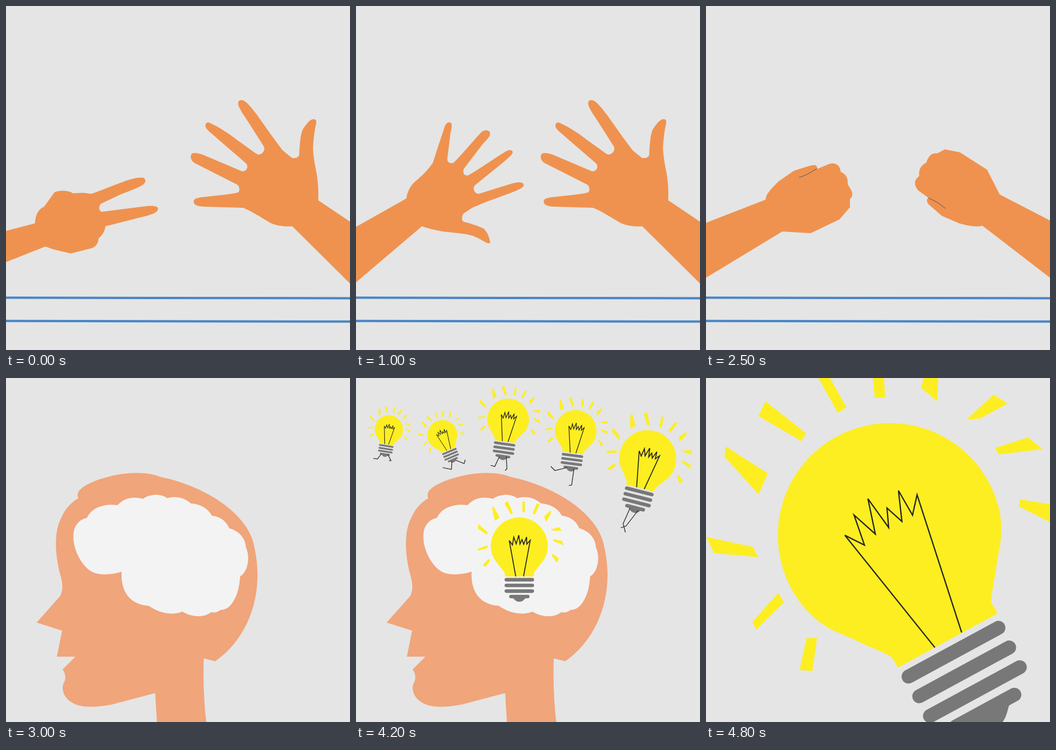
An HTML page for the animation above (5300 ms loop, 595 by 595 pixels).

```html
<!DOCTYPE html>
<html lang="en">
<head>
<meta charset="utf-8">
<title>Hands and ideas</title>
<style>
html, body { margin: 0; width: 100%; height: 100%; overflow: hidden; background: #e5e5e5; }
svg { display: block; width: 100%; height: 100%; }
.hand { fill: #ef924f; }
.crease { fill: none; stroke: #555; }
.table { fill: none; stroke: #4a86c5; stroke-width: 4; }
.glow { fill: #fdee21; }
.cap { fill: #787878; }
.bars { fill: none; stroke: #787878; stroke-width: 6.2; stroke-linecap: round; }
.wire { fill: none; stroke: #222; vector-effect: non-scaling-stroke; }
.legs { fill: none; stroke: #222; stroke-width: 1.2; }
</style>
</head>
<body>
<svg viewBox="0 0 595 595">
  <defs>
    <!-- upright bulb, globe radius 50 around the origin -->
    <g id="bulb">
      <path class="glow" d="M25.5 53.5L25.3 48C27.5 44 31 40.5 36 33.5C40 28 44.5 24.5 48 14A50 50 0 1 0-48 14C-44.5 24.5-40 28-36 33.5C-31 40.5-27.5 44-25.3 48L-25 53.5Z"/>
      <path class="glow" d="M-54.5 22.5L-50.5 24.8-59.3 36.7-64.1 33.5Z M-56.1-1.2L-55.8 3.7-72.5 8.5-72.4 4.7Z
        M-72.4-38.5L-56.2-24.6-56.3-19.5-72.7-30.4Z M-45.5-69.8L-34.7-50.2-42.8-44-48.1-66Z
        M-20.3-79L-11.2-57.8-14.7-55.7-26.2-74.7Z M5.4-78L9.9-78 10.1-59.3 5.6-59.1Z
        M30.9-75.3L35.4-72.3 27.4-55 23.3-57.1Z M55-62.6L55.5-56.6 47-42.5 43.5-51.2Z
        M70.4-33.1L74.2-26.6 60.1-26.6 54.7-29Z M74.9-9L78.1-1.3 59.7-8.6 59.8-11.9Z
        M58.6 13.6L69.5 22 65.6 29.1 56.6 16.1Z"/>
      <path class="wire" d="M-6.3 53.5L-17.7-9.6-12.1-1.6-9.8-15.6-5.5-3.6-.9-19 1.1-3.3 4.6-11.3 7.6-2.9 12.8-15.7 13.1-3.1 19.2-10.1 7.4 53.3"/>
      <path class="bars" d="M-22.8 59.3H22.8M-22.8 69.3H22.8M-22.8 79.3H22.8M-14.8 88.9H14.8"/>
      <path class="cap" d="M-14 90C-9 91-8 98 0 98S9 91 14 90Z"/>
    </g>
  </defs>

  <g id="game">
    <path class="table" d="M0 504.5L595 505.5M0 544.7L595 545.8"/>
    <g id="leftS"><path class="hand" d="M0 389L50 376C51 364 54 352 66 347L84 322C92 319 106 318 116 324C128 323 138 323 147 325C163 320 183 311 203 304C219 298 235 295 239 298C243 302 241 307 234 311C222 317 210 321 198 326L164 342C160 347 160 353 165 356L244 346C255 345 263 346 263 351C262 357 254 360 243 363L172 381C171 390 166 397 160 402C160 410 155 417 148 419L112 428 82 421 68 416 0 443Z"/></g>
    <g id="leftP"><path class="hand" d="M0 382L87 333C89 318 97 308 103 303C115 293 126 282 133 271C142 243 149 222 154 207C157 201 162 200 165 203C167 208 164 215 163 223L158 264C157 271 165 273 169 271C185 255 200 236 217 218C224 213 231 215 232 220C232 227 226 231 219 239L187 281C183 289 188 294 194 293C215 281 240 263 260 251C266 248 271 249 271 253C270 258 262 264 254 271L207 309C201 313 203 324 212 325L270 307C280 304 289 304 290 309C291 313 285 316 276 320C250 330 225 338 201 349L186 359C183 363 182 370 186 373C197 376 208 379 221 385C227 391 231 400 232 409C230 412 226 410 221 407C213 402 203 397 192 395C180 393 168 392 150 390C135 387 126 385 114 381L0 478Z"/></g>
    <g id="leftR">
      <path class="hand" d="M0 375L103 335C103 325 115 314 126 303L152 285C165 281 176 277 186 275C192 275 193 279 192 282L211 274C223 269 232 275 233 287C242 290 246 298 245 308C249 315 253 320 253 325C253 330 251 332 249 334L249 348 231 369 181 393 132 390 0 470Z"/>
      <path class="crease" d="M161 296.5Q172 294 192 281"/>
    </g>
    <g id="rightS"><path class="hand" d="M595 401L540 376C536 362 530 352 518 335L488 317C480 314 472 315 465 319C456 318 448 319 443 325L388 291C377 284 365 277 359 279C355 281 357 286 361 291L430 347C430 352 428 356 421 357L386 343C370 335 352 326 340 328C334 331 336 337 342 341C354 349 366 354 378 360L419 380C424 389 431 396 439 403C441 414 449 423 459 429L491 425C503 429 515 424 522 417L595 461Z"/></g>
    <g id="rightP"><path class="hand" d="M595 373L540 336C541 315 539 300 537 288C533 268 531 255 531 244C532 230 533 218 536 205C538 198 536 195 530 196C523 198 518 207 513 214C509 224 508 240 507 258C505 263 500 263 495 263C491 260 485 255 478 249C462 228 446 205 434 188C424 175 418 168 412 164C405 161 400 164 402 172C405 180 412 190 418 199L446 243C449 250 443 257 436 257C430 254 427 251 400 232C390 224 372 211 352 202C346 200 343 205 346 211C350 217 358 222 364 228L415 272C420 277 417 286 409 286L406 285 340 257C334 255 327 253 322 255C317 260 320 268 327 272L400 309C404 312 405 319 402 322C397 325 370 327 345 330C335 331 325 332 324.5 338C325 345 332 346 340 347L410 349C427 356 440 365 457 375C468 380 480 382 495 381L595 480Z"/></g>
    <g id="rightR">
      <path class="hand" d="M595 371L508 326 486 283 439 253 413 248 400 255C390 253 384 261 381 271C372 275 367 284 369 294C360 300 359 310 367 319L385 332C381 333 381 339 386 344L408 363 438 376C453 380 467 383 478 380L595 470Z"/>
      <path class="crease" d="M385 332Q400 338 414 350"/>
    </g>
  </g>

  <g id="mind">
    <path fill="#f0a57b" d="M261 595L258 545 182 565C150 571 125 570 112 560C100 552 96 540 99 529C104 521 104 513 98 504L120 482H88L97 437 53 423 93 378C99 370 98 355 95 344C85 310 82 268 95 243C102 226 113 215 125 208C121 199 127 191 143 183C180 165 235 158 267 171C340 186 417 231 429 290C433 308 435 324 435 341C435 400 410 456 362 490L342 485C341 520 342 560 346.5 595Z"/>
    <path fill="#f3f3f3" d="M140 242C148 224 170 217 193 220C205 206 222 205 237 209C248 200 268 200 279 208C295 203 310 208 320 217C338 218 350 227 356 238C372 240 382 249 386 260C402 264 414 276 415 293C423 310 418 336 405 343C404 358 401 373 395 383C388 397 378 402 371 401C365 406 360 406 355 405C340 416 320 413 305 404C290 411 265 407 247 394C215 392 198 370 200 335C180 341 158 342 145 333C125 318 112 285 118 262C122 250 130 244 140 242Z"/>
    <g id="ideas"></g>
  </g>

  <use id="big" href="#bulb" stroke-width="2.2" transform="translate(318.3 272) rotate(-28.5) scale(3.88)"/>
</svg>
<script>
const el = id => document.getElementById(id);
const show = (node, on) => { node.style.display = on ? '' : 'none'; };

// x, y, angle, scale, wire width, legs
const ideas = [
  [282.5, 290.5, 0, .985, 1.6, ''],
  [56.8, 88.9, 9, .49, 1, 'M44 131L37 140 30 139M55 132L60.5 143 57 143'],
  [149.5, 98.8, -23, .52, 1, 'M166 144L165 158 150 155M172 142L187 148 189 141.5'],
  [263, 71.7, 8, .722, 1.2, 'M248 136L240 153 233 151M260 136L261 157 258 160'],
  [380, 91.4, 7.5, .722, 1.2, 'M365 155L344 160 337 153M377 157L373 185 368 186'],
  [504.4, 139.5, 14.3, .985, 1.6, 'M474 225L462 252 466 267M488 229L467 256 458 259'],
  [524.7, 341.4, 11.3, .985, 1.6, 'M500 428L461 432 477 441M519 432L549 453 535 453'],
  [454.4, 505.1, 11, .798, 1.2, 'M431 575L420 597M446 577L473 597 484 589']
];
el('ideas').innerHTML = ideas.map(([x, y, angle, scale, wire, legs]) =>
  `<g><use href="#bulb" stroke-width="${wire}" transform="translate(${x} ${y}) rotate(${angle}) scale(${scale})"/>
  <path class="legs" d="${legs}"/></g>`).join('');
const bulbs = [...el('ideas').children];

// one throw per half second: Rock, Paper or Scissors
const throws = { left: 'SPPRSR', right: 'PRPSSR' };

function draw(now) {
  const t = now % 5300;
  show(el('game'), t < 3000);
  show(el('mind'), t >= 3000 && t < 4800);
  show(el('big'), t >= 4800);
  for (const side in throws)
    for (const pose of 'RPS')
      show(el(side + pose), throws[side][Math.floor(t / 500)] === pose);
  bulbs.forEach((bulb, i) => show(bulb, t >= 3200 + i * 200));
  requestAnimationFrame(draw);
}
draw(performance.now());
</script>
</body>
</html>
```
